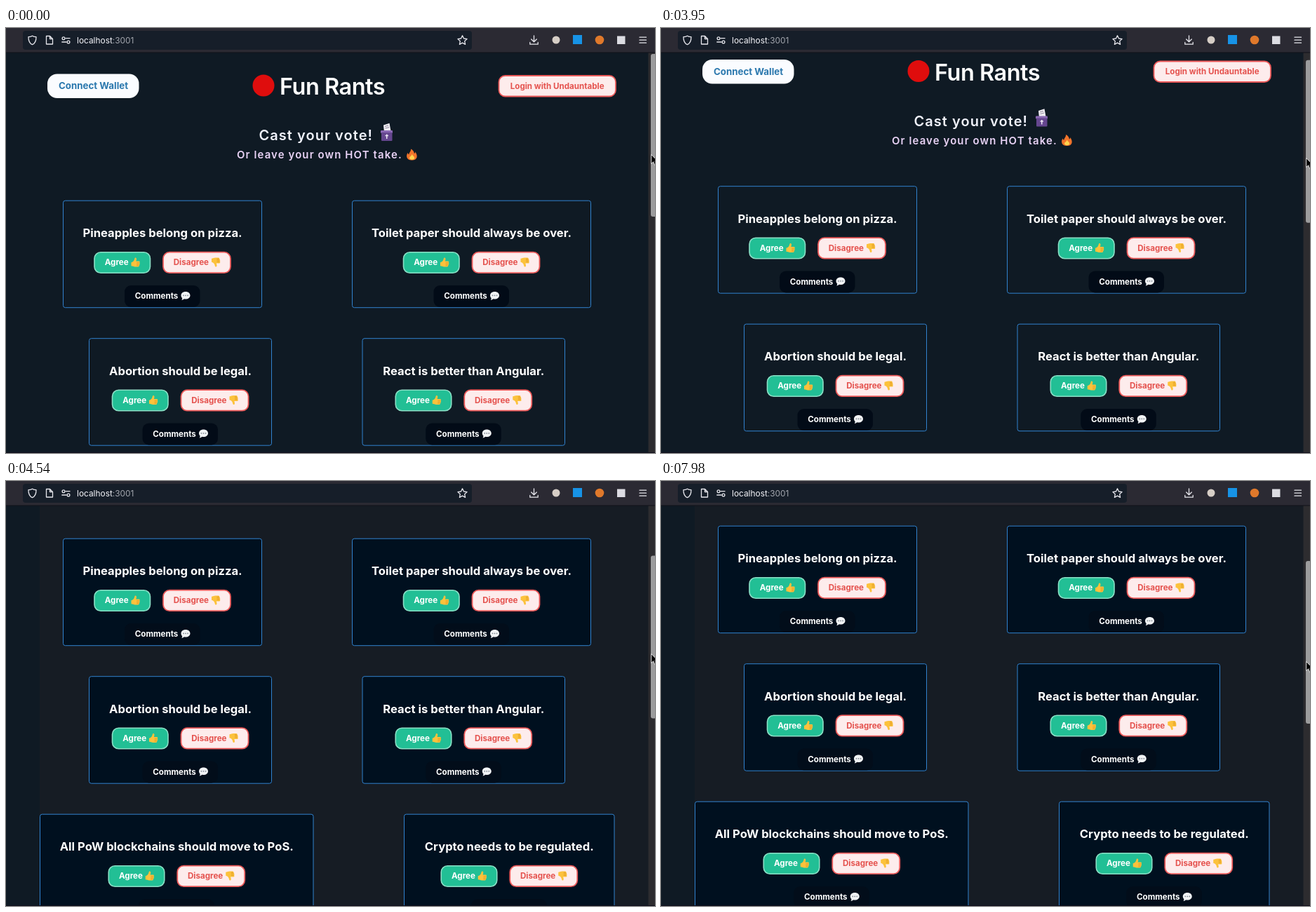
An HTML page for the animation above (8000 ms loop, 925x606 px).

```html
<!DOCTYPE html>
<html lang="en">
<head>
<meta charset="utf-8">
<title>Fun Rants</title>
<style>
@property --scroll { syntax: "<number>"; inherits: true; initial-value: 0; }
@property --cursor { syntax: "<number>"; inherits: true; initial-value: 180; }

html, body { margin: 0; width: 100%; height: 100%; overflow: hidden; background: #0f1a24; }
svg#stage {
  display: block; width: 925px; height: 606px;
  font-family: Inter, "Liberation Sans", sans-serif; font-weight: 600;
  animation: run 8s step-end infinite;
}
text { white-space: pre; }
.page { transform: translateY(calc(var(--scroll) * -1px)); }
.thumb { transform: translateY(calc(var(--scroll) * .4235px)); }
.cursor { transform: translate(919.3px, calc(var(--cursor) * 1px)); }
.panel { fill: var(--panel); }
.card { fill: var(--card); stroke: #3182ce; }
.note { fill: var(--note); }
.head { font-size: 16.6px; font-weight: 700; fill: #fff; text-anchor: middle; }
.btn { font-size: 11.6px; font-weight: 700; }
.yes { fill: #22bf95; stroke: #8be0c6; stroke-width: 1.6; }
.no { fill: #fdecec; stroke: #ec5a5a; stroke-width: 1.8; }
.red { fill: #e5534f; }
.white { fill: #fff; }
.icon { fill: none; stroke: #e6e6ec; stroke-width: 1.3; stroke-linecap: round; stroke-linejoin: round; }

@keyframes run {
  0%      { --scroll: 0; --cursor: 180; --panel: #0f1a24; --card: #0f1a24; --note: #020b17; }
  6.25%   { --cursor: 175; }
  8.125%  { --cursor: 171; }
  10%     { --cursor: 170; }
  47.5%   { --cursor: 173; }
  49.375% { --scroll: 20.5; --cursor: 185; }
  51.125% { --scroll: 67; --cursor: 206; --panel: #0c1723; --card: #0c1723; --note: #020c19; }
  53%     { --scroll: 108.7; --cursor: 225; }
  54.875% { --scroll: 134; --cursor: 237; --panel: #161c24; --card: #00101f; --note: #020d1a; }
  56.75%  { --scroll: 164; --cursor: 246; }
  58.625% { --scroll: 181; --cursor: 247; }
  60.375% { --scroll: 182; --cursor: 247; }
  99.75%  { --cursor: 257; }
}
</style>
</head>
<body>
<svg id="stage" viewBox="0 0 925 606">
  <defs>
    <g id="hand">
      <path fill="#fcc23c" d="M1 7.2C4 6.4 5.4 4.4 5.9 1.4 6.2 0 8.3.3 8.5 2.1c.1 1.1-.3 2.2-.7 3.3h4c1.8 0 1.8 2 .8 2.3 1.1.5.9 1.9-.1 2.1.8.6.5 1.7-.5 1.9.4.9-.2 1.7-1.3 1.7H6.5C4.5 13.4 3 12.4 1 12.3Z"/>
      <path fill="none" stroke="#d98f1f" stroke-width=".7" d="M8.6 7.7h3.8M8.5 9.8h3.7M8.5 11.7h3.2"/>
    </g>
    <g id="bubble">
      <path fill="#f1f3f5" d="M7 1C10.8 1 13.5 3.2 13.5 6.3S10.8 11.6 7 11.6c-.8 0-1.6-.1-2.3-.3C3.8 12.4 2.6 13 1.2 13c.8-.8 1-1.7.9-2.9C1 9.1.5 7.8.5 6.3.5 3.2 3.2 1 7 1Z"/>
      <g fill="#7c848e"><circle cx="4" cy="6.3" r=".9"/><circle cx="7" cy="6.3" r=".9"/><circle cx="10" cy="6.3" r=".9"/></g>
    </g>
  </defs>

  <rect width="925" height="606" fill="#0f1a24"/>
  <rect class="panel" x="48" y="35" width="868" height="571"/>

  <g class="page">
    <rect x="59" y="65.5" width="130.5" height="34.5" rx="14" fill="#fafcff"/>
    <text x="124.5" y="87" font-size="13.3" font-weight="700" fill="#2b78ae" text-anchor="middle">Connect Wallet</text>
    <circle cx="367" cy="82" r="15.5" fill="#df0d0d"/>
    <text x="390" y="95" font-size="32.5" letter-spacing="-.5" class="white">Fun Rants</text>
    <rect class="no" x="702.5" y="68" width="166.5" height="29.5" rx="9"/>
    <text class="btn red" x="785.7" y="86.5" text-anchor="middle">Login with Undauntable</text>

    <text x="360.5" y="160" font-size="20" letter-spacing="1.05" fill="#f0f2fb">Cast your vote!</text>
    <g>
      <path fill="#f1eef5" d="m538 138.500 8.500-2.800 2 11-9.500 2Z"/>
      <path stroke="#8b8496" d="m540 140.500 5-1.600M540.500 143l5.500-1.500"/>
      <rect x="534" y="146" width="17" height="4" rx="1" fill="#8a68b4"/>
      <rect x="535" y="149" width="15.5" height="12" rx="1" fill="#65468f"/>
      <path fill="none" stroke="#eee8f6" stroke-width="1.5" d="M542.7 151.500v6.500M540.500 153.500h4.400"/>
    </g>
    <text x="329" y="186" font-size="14.9" letter-spacing="1.14" fill="#e9d3f6">Or leave your own HOT take.</text>
    <path fill="#f2742b" d="M577 172.500c4 2 4.500 4.500 5 6.500 1-.5 1.200-1.600 1.200-2.600 4 5 3.800 12.100-4.700 12.100-8 0-8.800-6.500-5.800-10.500.2 1.200.7 2 1.500 2.500.2-3 3.300-4.500 2.800-8Z"/>
    <path fill="#ffd34d" d="M578.800 179.500c.4 3 3.800 3.700 3.400 6-.5 3-7 3-7.200-.2-.1-2 3.400-2.500 3.800-5.800Z"/>

    <g id="cards"></g>
  </g>

  <rect x="915.5" y="35" width="9.5" height="571" fill="#2d2c2f"/>
  <rect class="thumb" x="919" y="37" width="8" height="232" rx="3" fill="#9c9c9d"/>
  <rect y="605" width="925" height="1" fill="#100e1b"/>

  <rect width="925" height="35" fill="#2b2a33"/>
  <rect y="34.5" width="925" height="1" fill="#101118"/>
  <rect x="24" y="4" width="640" height="27" rx="4" fill="#161e29"/>
  <g class="icon">
    <path d="M37.500 11.200c1.700 1.100 3.500 1.500 5.500 1.500.1 5.500-1.600 9.200-5.500 11-3.900-1.800-5.600-5.500-5.500-11 2 0 3.800-.4 5.500-1.500Z"/>
    <path d="M57.500 11.500h5l4 4v7.500h-9ZM62.500 11.700v3.800h3.800"/>
    <path d="M85 14.700h6M79.800 20h6.200"/>
    <circle cx="82" cy="14.7" r="1.9"/><circle cx="89" cy="20" r="1.9"/>
    <path d="m650.500 10.800 2 4.200 4.600.6-3.400 3.200.9 4.600-4.100-2.300-4.100 2.300.9-4.600-3.400-3.200 4.600-.6Z"/>
    <path d="M752.500 11v8.500M748.700 16l3.800 3.700 3.800-3.700M746.800 20.500v2.700h11.400v-2.700"/>
    <path d="M903 13.200h9.500M903 17.200h9.500M903 21.200h9.500"/>
  </g>
  <text x="101" y="22" font-size="11.9" font-weight="400" fill="#f5f5fa">localhost<tspan fill="#a3a6ae">:3001</tspan></text>
  <circle cx="784" cy="17" r="5.5" fill="#d6cec6"/>
  <rect x="808" y="10" width="13" height="13" fill="#1793e6"/>
  <circle cx="846" cy="17" r="6.3" fill="#e0792b"/>
  <rect x="871" y="11.5" width="11.5" height="11.5" fill="#dcdce2"/>

  <path class="cursor" fill="#000" stroke="#fff" stroke-width=".8" d="M.3.500v13l3-2.700 2.200 5 2.300-1-2.200-4.800h4.300Z"/>
</svg>
<script>
// left, top, width, statement
const cards = [
  [81.5, 246, 283, "Pineapples belong on pizza."],
  [493.5, 246, 340, "Toilet paper should always be over."],
  [118.5, 442.5, 260, "Abortion should be legal."],
  [508, 442.5, 288.5, "React is better than Angular."],
  [48.5, 639, 389.5, "All PoW blockchains should move to PoS."],
  [567.5, 639, 299.5, "Crypto needs to be regulated."]
];

const label = (x, y, text, cls) => `<text class="btn ${cls}" x="${x}" y="${y}">${text}</text>`;

const draw = ([x, y, w, text]) => `
  <rect class="card" x="${x}" y="${y + .2}" width="${w}" height="152.5" rx="3"/>
  <g transform="translate(${x + w / 2} ${y})">
    <text class="head" y="52">${text}</text>
    <rect class="yes" x="-97" y="73.7" width="79.5" height="29.5" rx="9"/>
    ${label(-82.3, 92, "Agree", "white")}
    <use href="#hand" x="-45.5" y="81"/>
    <rect class="no" x="1" y="73.7" width="96" height="29.5" rx="9"/>
    ${label(15.7, 92, "Disagree", "red")}
    <use href="#hand" transform="translate(69 95) scale(1 -1)"/>
    <rect class="note" x="-54" y="121" width="107.5" height="31" rx="9"/>
    ${label(-39.3, 140, "Comments", "white")}
    <use href="#bubble" x="26" y="129"/>
  </g>`;

document.getElementById("cards").innerHTML = cards.map(draw).join("");
</script>
</body>
</html>
```
